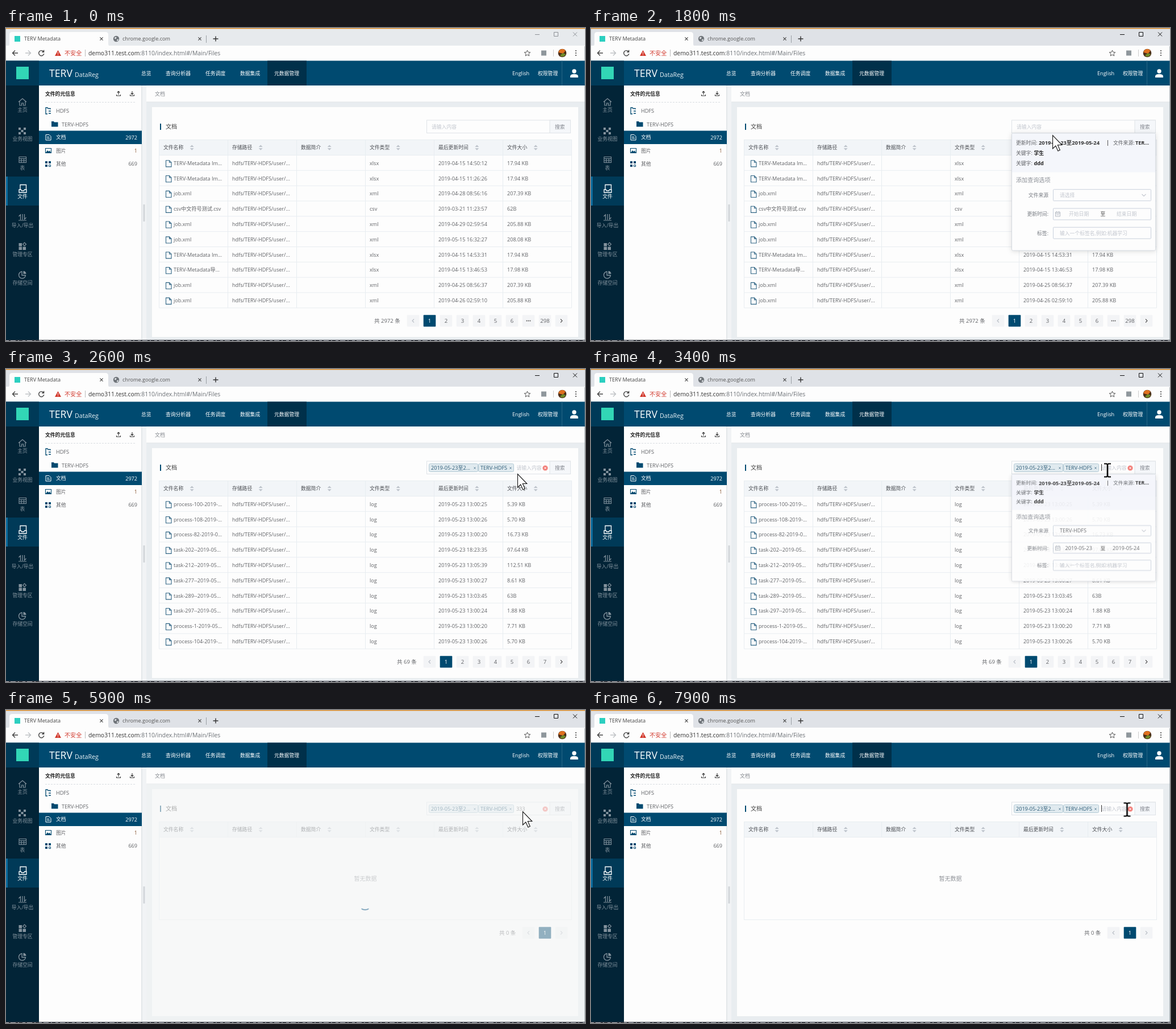
Write an HTML page that moves like this. It is 1019 by 550 pixels and loops after 8 s.

```html
<!DOCTYPE html>
<html lang="zh">
<head>
<meta charset="utf-8">
<title>TERV Metadata</title>
<style>
html, body { margin: 0; width: 100%; height: 100%; overflow: hidden; background: #fff; }
svg { display: block; width: 1019px; height: 550px; }
text { font-family: "Open Sans", "Noto Sans CJK SC", "Noto Sans CJK", sans-serif; white-space: pre; }

#menu { transform-origin: 0 185px; animation: menu 8s linear infinite; }
@keyframes menu {
  0%, 12.6% { opacity: 0; transform: scaleY(0); }
  15.6%, 27% { opacity: 1; transform: scaleY(1); }
  30%, 39.5% { opacity: 0; transform: scaleY(0); }
  42.8%, 71% { opacity: 1; transform: scaleY(1); }
  73%, 100% { opacity: 0; transform: scaleY(0); }
}
#mask { animation: mask 8s linear infinite; }
@keyframes mask {
  0%, 27.3% { opacity: 0; }
  28.6%, 30.6% { opacity: 1; }
  32.2%, 71% { opacity: 0; }
  72.8%, 75% { opacity: 1; }
  76.5%, 100% { opacity: 0; }
}
#spin { transform-origin: 632px 339px; animation: spin 2s linear infinite; }
@keyframes spin { from { transform: rotate(79deg); } to { transform: rotate(439deg); } }

#pointer { animation: pointer 8s linear infinite; }
@keyframes pointer {
  0%, 1.2% { transform: translate(1012px, 8px); }
  5% { transform: translate(958px, 66px); }
  8% { transform: translate(915px, 112px); }
  10% { transform: translate(880px, 148px); }
  12.3%, 20.6% { transform: translate(806px, 171px); }
  22.5% { transform: translate(812px, 188px); }
  25%, 27.5% { transform: translate(815px, 195px); }
  32%, 33.5% { transform: translate(900px, 184px); }
  37.5%, 79% { transform: translate(909px, 178px); }
  81.25% { transform: translate(838px, 185px); }
  82.5% { transform: translate(892px, 181px); }
  83.75%, 100% { transform: translate(943.5px, 175px); }
}
#caret { animation: caret 8s step-end infinite; }
@keyframes caret {
  0% { opacity: 0; transform: translateX(748px); }
  12.5% { opacity: 1; transform: translateX(748px); }
  18.75% { opacity: 0; transform: translateX(748px); }
  25% { opacity: 1; transform: translateX(748px); }
  27.5% { opacity: 0; transform: translateX(898px); }
  40% { opacity: 1; transform: translateX(898px); }
  46.25% { opacity: 0; transform: translateX(898px); }
  52.5% { opacity: 1; transform: translateX(903px); }
  53.75% { opacity: 1; transform: translateX(908px); }
  56.25% { opacity: 1; transform: translateX(913px); }
  61.25% { opacity: 0; transform: translateX(913px); }
  67.5% { opacity: 1; transform: translateX(913px); }
  71.25% { opacity: 0; transform: translateX(913px); }
  83.75% { opacity: 1; transform: translateX(913px); }
  86.25% { opacity: 0; transform: translateX(913px); }
  92.5% { opacity: 1; transform: translateX(908px); }
  95% { opacity: 1; transform: translateX(903px); }
  97.5%, 100% { opacity: 1; transform: translateX(898px); }
}
</style>
</head>
<body>
<svg id="stage" viewBox="0 0 1019 550" xmlns="http://www.w3.org/2000/svg"></svg>
<script>
const LOOP = 8000, NAVY = '#004a70', GREY = '#606266', PALE = '#c3c7cf', LINE = '#e8edf1';
let css = '', out = '';
const add = s => { out += s; };

// y is the vertical middle of the text
function text(x, y, s, fill = GREY, o = {}) {
  const size = o.size || (/[a-z0-9]/i.test(s) ? 9.1 : 8.8);
  add(`<text x="${x}" y="${(y + size * .36).toFixed(2)}" font-size="${size}" fill="${fill}"` +
    ` font-weight="${o.weight || 400}" text-anchor="${o.anchor || 'start'}">${s}</text>`);
}
function box(x, y, w, h, fill, stroke = 'none', r = 0) {
  add(`<rect x="${x}" y="${y}" width="${w}" height="${h}" rx="${r}" fill="${fill}" stroke="${stroke}"/>`);
}
function path(d, stroke, width = 1, fill = 'none') {
  add(`<path d="${d}" stroke="${stroke}" stroke-width="${width}" fill="${fill}"/>`);
}
const dot = (x, y, r, fill) => add(`<circle cx="${x}" cy="${y}" r="${r}" fill="${fill}"/>`);
const cross = (x, y, r, c, w = 1) => path(`M${x - r},${y - r}l${2 * r},${2 * r}m0,${-2 * r}l${-2 * r},${2 * r}`, c, w);

function group(id, draw) {
  add(`<g id="${id}">`);
  draw();
  add('</g>');
}
// a group that is visible only within the given spans, in ms
function during(id, spans, draw) {
  let keys = `0%{opacity:${spans[0][0] ? 0 : 1}}`;
  for (const [a, b] of spans) {
    if (a) keys += `${a / LOOP * 100}%{opacity:1}`;
    if (b < LOOP) keys += `${b / LOOP * 100}%{opacity:0}`;
  }
  css += `@keyframes ${id}{${keys}}#${id}{animation:${id} ${LOOP}ms step-end infinite}\n`;
  group(id, draw);
}

function controls(c) {
  path('M931,11.5h8', c);
  path('M964.5,7.5h7v7h-7z', c);
  cross(1001.5, 11, 3.5, c);
}

function browser() {
  box(0, 0, 1019, 32, '#e7eaed');
  during('idle', [[0, 1000]], () => controls('#8d9196'));
  during('awake', [[1000, LOOP]], () => { box(0, 1, 1019, 31, '#dfe2e7'); controls('#111'); });
  box(0, 0, 1019, 1.4, '#dd8a23');
  path('M2,32q4,0 4,-4v-16q0,-5 5,-5h164q5,0 5,5v16q0,4 4,4z', 'none', 0, '#fdfdfd');
  box(15, 14, 10, 10, '#2ccfc0');
  text(32, 19, 'TERV Metadata', '#444');
  cross(168, 19, 2.6, '#444', 1.1);
  dot(194, 19, 5.2, '#70757a');
  path('M190.5,17.5l3,-2l1,2l-2,2zM195,20.5l3,-1l-1,3l-2,0z', 'none', 0, '#e7eaed');
  text(205, 19, 'chrome.google.com', '#555');
  cross(341, 19, 2.6, '#444', 1.1);
  path('M352.5,13v13', '#9a9fa5');
  path('M364.5,19h9M369,14.5v9', '#333', 1.4);

  box(0, 31, 1019, 26.5, '#fdfdfd');
  path('M21,44h-9M16,39.5l-4.5,4.5l4.5,4.5', '#444', 1.4);
  path('M34,44h9M39,39.5l4.5,4.5l-4.5,4.5', '#bfc2c5', 1.4);
  path('M66,41.5a4.6,4.6 0 1 0 .8,3.6M66.6,38.8v3.4h-3.4', '#444', 1.4);
  path('M86,49l5.5,-10l5.5,10z', 'none', 0, '#d23a2e');
  path('M91.5,42.5v3M91.5,46.5v1.2', '#fff', 1);
  text(103, 44, '不安全', '#d23a2e', { size: 10.1 });
  path('M139.5,38v12', '#bbb');
  text(145, 44, 'demo311.test.com<tspan fill="#6b7075">:8110/index.html#/Main/Files</tspan>', '#333', { size: 10.4 });
  path('M917.5,39l1.5,3.5l3.8,.3l-2.9,2.5l.9,3.7l-3.3,-2l-3.3,2l.9,-3.7l-2.9,-2.5l3.8,-.3z', '#555', 1);
  box(942, 39.5, 9, 9, '#8f979c');
  path('M963.5,38v12', '#ccc');
  dot(979, 44, 7.3, '#4a2d18');
  path('M972.5,43a6.5,6.5 0 0 1 12,-3l-4,5z', 'none', 0, '#e0701f');
  path('M975,48l5,-4l5,2a7,7 0 0 1 -8,4z', 'none', 0, '#6d8a2a');
  [40, 44, 48].forEach(y => dot(1003, y, 1.1, '#444'));
}

function header() {
  box(0, 57.5, 1019, 44, NAVY);
  box(0, 57.5, 58, 44, '#003a58');
  box(460, 57.5, 69, 44, '#00304a');
  box(18, 68, 22, 22, '#32d6b6');
  text(76, 80, 'TERV', '#fff', { size: 17.6 });
  text(121, 82, 'DataReg', '#e8f0f4', { size: 10.7 });
  const nav = { weight: 500 };
  [[238, '总览'], [281, '查询分析器'], [351, '任务调度'], [412, '数据集成'], [472, '元数据管理'], [936, '权限管理']]
    .forEach(([x, s]) => text(x, 80, s, '#fff', nav));
  text(891, 80, 'English', '#fff', nav);
  path('M978.5,57.5v44', '#2a6685');
  dot(1000, 76, 3.7, '#fff');
  path('M993,87v-2q0,-4 7,-4t7,4v2z', 'none', 0, '#fff');
}

function sidebar() {
  box(0, 101, 58, 447, '#022437');
  box(0, 261, 58, 51, '#003a58');
  box(0, 261, 3, 51, '#0a6c9f');
  const c = '#83929d';
  path('M22,130l7,-6l7,6M24,129v7h3.5v-4h3v4h3.5v-7', c, 1.2);
  [[22, 175], [31, 175], [26.5, 179], [22, 183], [31, 183]].forEach(([x, y]) => box(x, y, 4, 4, c));
  path('M23,226.5h12.5v10h-12.5zM23,229.5h12.5M27,229.5v7M31.5,229.5v7M23,233h12.5', c, 1.1);
  path('M25,284v-8.5h10.5v9M23,284h3.5l1,2h4l1,-2h3.5v5h-13z', '#fff', 1.3);
  path('M25.5,337v-9l-3,3M29,337v-10M32.5,327v9l3,-3M22,338h14', c, 1.2);
  [[22.5, 378], [22.5, 384.5], [29.5, 384.5]].forEach(([x, y]) => box(x, y, 5.5, 5.5, c));
  path('M32.5,377l3,3l-3,3l-3,-3z', c, 1.1);
  path('M28,428a6,6 0 1 0 6.5,6.5h-6.5z', c, 1.3);
  path('M30.5,427v5h5a5,5 0 0 0 -5,-5z', 'none', 0, c);
  ['主页', '业务视图', '表', '文件', '导入/导出', '管理专区', '存储空间'].forEach((s, i) =>
    text(29, 144 + i * 50.7, s, i === 3 ? '#fff' : c, { anchor: 'middle' }));
}

function tree() {
  box(58, 101, 181, 447, '#fdfdfd');
  box(239, 101, 8, 447, '#f1f3f5');
  path('M238.9,101v447', '#d3d8dc');
  box(241.5, 310, 3, 30, '#d2d6da');
  text(69, 115.5, '文件的元信息', '#222', { weight: 700 });
  path('M194.5,117v2h7v-2M198,117v-5.5M195.8,113.5l2.2,-2.2l2.2,2.2', '#333', 1.1);
  path('M218.5,117v2h7v-2M222,111v5.5M219.8,114.5l2.2,2.2l2.2,-2.2', '#333', 1.1);
  add('<path d="M69,130.5h158" stroke="#d9dde1" stroke-dasharray="3 2"/>');
  path('M78,143v-1.5h-4l-1,-1.5h-3v11h3M75,146h4M75,150h4', NAVY, 1.3);
  text(88, 146, 'HDFS');
  path('M80,164h4l1,1.5h6.5v8h-11.5z', 'none', 0, NAVY);
  text(98, 169.3, 'TERV-HDFS');
  box(58, 180.5, 181, 23.5, NAVY);
  path('M70,187.5h6l3,3v6.500h-9zM72,191.500h4M72,194h5', '#fff', 1);
  text(88, 192.3, '文档', '#fff');
  text(231, 192.3, '2972', '#fff', { anchor: 'end' });
  path('M69.500,211.500h10v8h-10z', NAVY, 1.1);
  path('M70,219l3,-4l2,2l2,-1.500l2,3.500z', 'none', 0, NAVY);
  text(88, 215.500, '图片');
  text(231, 215.500, '1', '#8a5a35', { anchor: 'end' });
  [[69, 234], [75, 234], [69, 240]].forEach(([x, y]) => box(x, y, 4, 4, NAVY));
  path('M75.500,240.500h3v3h-3z', NAVY, 1);
  text(88, 239, '其他');
  text(231, 239, '669', GREY, { anchor: 'end' });
}

function pager(y, totalX, total, pages, atStart, atEnd) {
  text(totalX, y, `共 ${total} 条`, GREY, { size: 9.5 });
  const all = ['<', ...pages, '>'];
  all.forEach((p, i) => {
    const x = 977.5 - 29 * (all.length - 1 - i), on = p === 1;
    box(x - 10.800, y - 10.300, 21.600, 20.500, on ? NAVY : '#f3f4f6', 'none', 1);
    if (p === '<') path(`M${x + 1.500},${y - 3}l-3,3l3,3`, atStart ? '#b9bec6' : '#555', 1.1);
    else if (p === '>') path(`M${x - 1.500},${y - 3}l3,3l-3,3`, atEnd ? '#b9bec6' : '#555', 1.1);
    else if (p === '…') [-3, 0, 3].forEach(d => dot(x + d, y, 1, '#555'));
    else text(x, y, p, on ? '#fff' : GREY, { anchor: 'middle', size: 9.600 });
  });
}

const cols = [269.500, 390.500, 511.500, 632.500, 753.500, 874.500];
const rowH = 26.830, top0 = 223.500;

function rows(list) {
  box(257, 537, 750, 6, '#fdfdfd');
  list.split('\n').forEach((line, i) => {
    const [name, type, date, size] = line.split('|'), y = top0 + rowH * i, m = y + 13.900;
    path(`M269.500,${y + rowH}H995.500`, LINE);
    path(`M281.500,${m - 4.700}h6l3.500,3.500v7.700h-9.500zM287.500,${m - 4.700}v3.500h3.500`, '#2f6484', 1.1);
    text(295, m, name);
    text(398, m, 'hdfs/TERV-HDFS/user/...');
    text(640, m, type);
    text(761, m, date);
    text(882, m, size);
  });
  [...cols, 995.500].forEach(x => path(`M${x},${top0}v${rowH * 10}`, LINE));
}

const allFiles = `TERV-Metadata Im...|xlsx|2019-04-15 14:50:12|17.94 KB
TERV-Metadata Im...|xlsx|2019-04-15 11:26:26|17.94 KB
job.xml|xml|2019-04-28 08:56:16|207.39 KB
csv中文符号测试.csv|csv|2019-03-21 11:23:57|62B
job.xml|xml|2019-04-29 02:59:54|205.88 KB
job.xml|xml|2019-05-15 16:32:27|208.08 KB
TERV-Metadata Im...|xlsx|2019-04-15 14:53:31|17.94 KB
TERV-Metadata导...|xlsx|2019-04-15 13:46:53|17.98 KB
job.xml|xml|2019-04-25 08:56:37|207.39 KB
job.xml|xml|2019-04-26 02:59:10|205.88 KB`;
const logFiles = `process-100-2019-...|log|2019-05-23 13:00:25|5.39 KB
process-108-2019-...|log|2019-05-23 13:00:26|5.70 KB
process-82-2019-0...|log|2019-05-23 13:00:20|16.73 KB
task-202--2019-05...|log|2019-05-23 18:23:35|97.64 KB
task-212--2019-05...|log|2019-05-23 13:05:39|112.51 KB
task-277--2019-05...|log|2019-05-23 13:00:27|8.61 KB
task-289--2019-05...|log|2019-05-23 13:03:45|63B
task-297--2019-05...|log|2019-05-23 13:00:24|1.88 KB
process-1-2019-05...|log|2019-05-23 13:00:20|7.71 KB
process-104-2019-...|log|2019-05-23 13:00:26|5.70 KB`;

function tag(x, w, s) {
  box(x + .5, 166.500, w, 14, '#e0eaef', '#b4cad5', 2);
  text(x + 4, 173.700, s, '#2b5a76');
  cross(x + w - 5, 174, 1.600, '#5d8197', .9);
}

function search() {
  box(740.500, 162, 253, 22.500, '#fdfdfd', '#dfe3e8');
  box(957, 162, 36.500, 22.500, '#f5f7fa', '#dfe3e8');
  text(966, 173.700, '搜索', '#80858d');
  during('hint', [[0, 2200]], () => text(749, 173.700, '请输入内容', PALE));
  during('tags', [[2200, LOOP]], () => {
    tag(744, 86, '2019-05-23至2...');
    tag(831, 62, 'TERV-HDFS');
    dot(949, 174, 4.600, '#f2807b');
    cross(949, 174, 1.700, '#fff');
  });
  during('hint2', [[2200, 4200], [7800, LOOP]], () => text(898.500, 173.700, '请输入内容', PALE));
  [[4200, 7800], [4300, 7600], [4500, 7400]].forEach((span, i) =>
    during('key' + i, [span], () => text(898 + 5.100 * i, 173.700, '3')));
  group('caret', () => path('M.5,167v12', '#333'));
}

function content() {
  box(247, 101, 772, 29, '#fdfdfd');
  text(262, 116, '文档', '#85898f', { size: 9 });
  box(247, 130, 772, 418, '#e9edf0');
  path('M247,130h772', '#e1e5e8');
  box(257, 139, 750, 399, '#fdfdfd');
  box(271, 168, 2, 11, NAVY);
  text(281, 173.500, '文档', '#444', { size: 10.100 });
  during('tableAll', [[0, 2450]], () => {
    rows(allFiles);
    pager(514.500, 648, 2972, [1, 2, 3, 4, 5, 6, '…', 298], true);
  });
  during('tableLog', [[2450, 5830]], () => {
    rows(logFiles);
    pager(514.500, 688, 69, [1, 2, 3, 4, 5, 6, 7], true);
  });
  during('tableNone', [[5830, LOOP]], () => {
    box(269.500, 223.500, 726, 145, '#fdfdfd', LINE);
    text(632.500, 296.500, '暂无数据', '#909399', { size: 10, anchor: 'middle' });
    pager(391.500, 868, 0, [1], true, true);
  });
  box(269.500, 196.500, 726, 27, '#f2f5f8', LINE);
  ['文件名称', '存储路径', '数据简介', '文件类型', '最后更新时间', '文件大小'].forEach((s, i) => {
    const x = cols[i] + 7.500, a = x + s.length * 8.800 + 15;
    if (i) path(`M${cols[i]},197v26`, LINE);
    text(x, 210, s, '#4c4f54', { weight: 500 });
    path(`M${a - 3.500},209l3.500,-3.500l3.500,3.500zM${a - 3.500},211.300h7l-3.500,3.500z`, 'none', 0, '#bcc2ca');
  });
  search();
  group('mask', () => {
    add('<rect x="247" y="130" width="772" height="418" fill="#f4f5f5" opacity=".6"/>');
    add('<circle id="spin" cx="632" cy="339" r="12" fill="none" stroke="#5f8fac" stroke-width="1.500" stroke-linecap="round" stroke-dasharray="12 64"/>');
  });
}

function menu() {
  add('<rect x="740.500" y="185" width="253" height="206" rx="2" fill="#fdfdfd" stroke="#d5dae0" style="filter:drop-shadow(0 1px 4px #0002)"/>');
  box(741, 185.500, 252, 68, '#f4f6fb');
  const strong = { weight: 700 };
  text(748, 202, '更新时间:');
  text(788, 202, '2019-05-23至2019-05-24', '#333', { weight: 700, size: 9.400 });
  path('M909.500,197v10', '#555');
  text(919, 202, '文件来源:');
  text(958, 202, 'TER...', '#333', strong);
  text(748, 220, '关键字:');
  text(779.500, 220, '学生', '#222', strong);
  text(748, 238, '关键字:');
  text(779.500, 238, 'ddd', '#222', strong);
  text(748, 267, '添加查询选项', '#8b8f96', { size: 10.100 });
  [['文件来源', 294], ['更新时间:', 327.300], ['标签:', 360.500]].forEach(([s, y]) => {
    text(805, y, s, '#777b82', { anchor: 'end' });
    box(813.500, y - 10.300, 172, 20, '#fdfdfd', '#c9d0dc', 1);
  });
  path('M969.500,292l3.500,3.500l3.500,-3.500', PALE, 1.1);
  path('M817.500,323.500h8v7.500h-8zM817.500,325.500h8M819.500,322v2M823.500,322v2M819,328h5', '#b4bac3', 1);
  text(901, 327.300, '至', '#444', { anchor: 'middle' });
  text(825, 360.500, '输入一个标签名,例如:机器学习', PALE);
  during('blank', [[0, 2500]], () => {
    text(825, 294, '请选择', PALE);
    text(841, 327.300, '开始日期', PALE);
    text(925, 327.300, '结束日期', PALE);
  });
  during('filled', [[2500, LOOP]], () => {
    text(825, 294, 'TERV-HDFS');
    text(834.500, 327.300, '2019-05-23');
    text(918, 327.300, '2019-05-24');
  });
}

function pointer() {
  during('arrow', [[100, 930], [1680, 2900], [5700, 6600]], () =>
    path('M.5,.5v23.500l5.300,-5l4,9l3.500,-1.600l-4,-8.900h7.500z', '#111', 1.1, '#fff'));
  during('beam', [[930, 1680], [2900, 5700], [6600, LOOP]], () => {
    path('M-6,-11.500H-1.500L0,-10L1.500,-11.500H6M-6,11.500H-1.500L0,10L1.500,11.500H6', '#000', 2);
    path('M0,-11V11', '#000', 2.600);
  });
}

browser();
header();
sidebar();
tree();
content();
group('menu', menu);
box(0, 548, 1019, 2, '#3a3d44');
add('<path d="M0,549.500h1019" stroke="#b9bcc4" stroke-dasharray="5 3 9 4 2 6"/>');
path('M1018.500,32v516', '#7f8a92', .6);
group('pointer', pointer);

document.head.appendChild(document.createElement('style')).textContent = css;
document.getElementById('stage').innerHTML = out;
</script>
</body>
</html>
```
